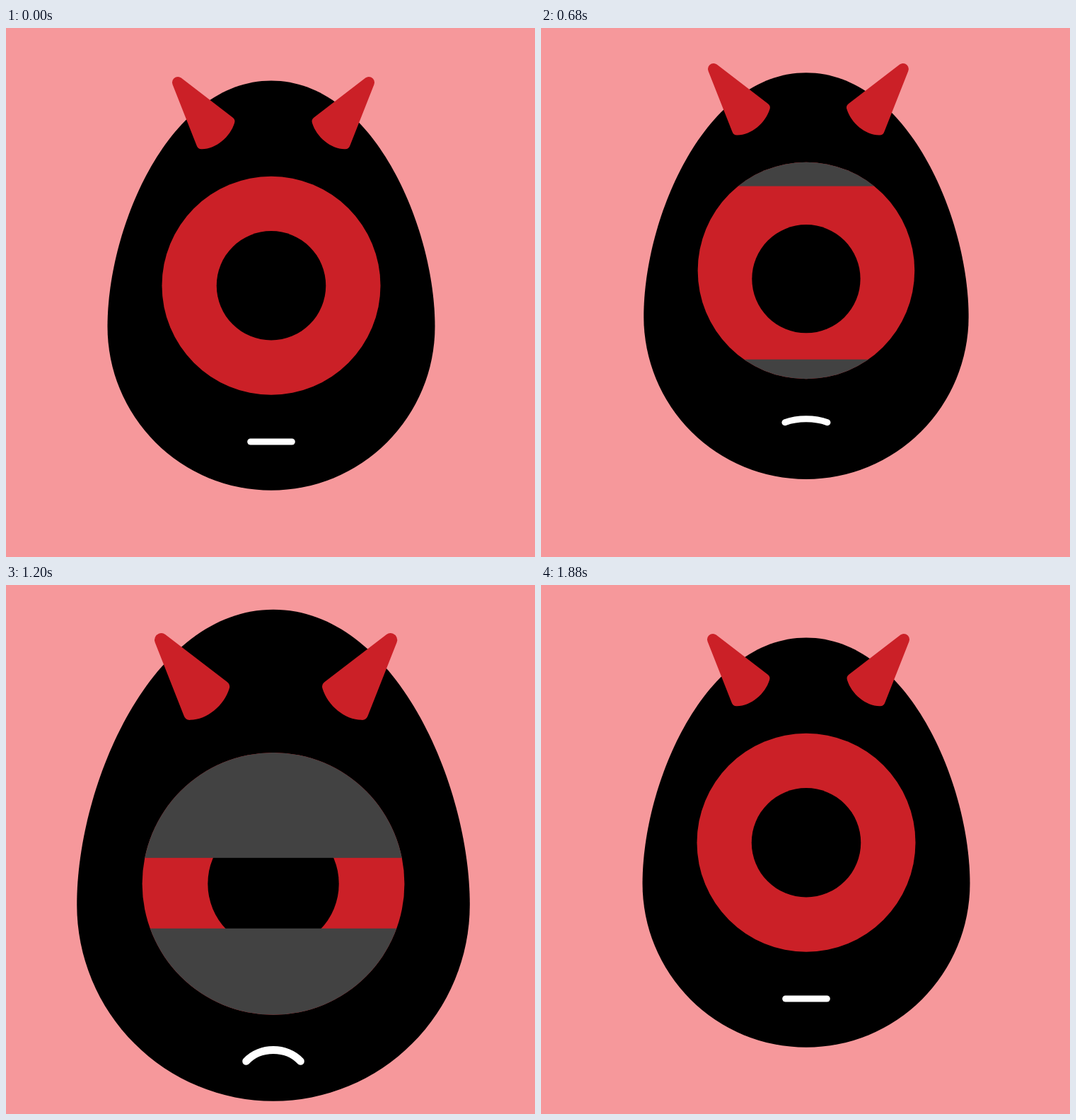
Recreate the animation shown at these times as an HTML page with a canvas. Size 748x748 px, loop 1.92 s.

```html
<!DOCTYPE html>
<html lang="en">
<head>
<meta charset="utf-8">
<title>Grumpy egg</title>
<style>
html, body { margin: 0; width: 100%; height: 100%; overflow: hidden; background: #f6989b; }
canvas { display: block; width: 100vw; height: 100vh; }
</style>
</head>
<body>
<canvas id="stage" width="748" height="748"></canvas>
<script>
const ctx = document.getElementById('stage').getContext('2d');
const LOOP = 1920, STEP = 40, SIZE = 748;
const PINK = '#f6989b', RED = '#cb2027', GREY = '#424242', BLACK = '#000', WHITE = '#fff';
const CX = 375, CY = 364.25, EYE = 154.5;

const clamp = x => Math.min(1, Math.max(0, x));
const mix = (a, b, u) => a + (b - a) * u;

// Eased 0 to 1 between two times; bend below 1 starts faster, above 1 slower.
function ramp(t, from, to, bend = 1) {
  const u = clamp((t - from) / (to - from)) ** bend;
  return u * u * (3 - 2 * u);
}

// Wind up to low, burst to high, then calm down to zero.
const WIND = 600;
const GROW = [WIND, 1000, 0.62], SNAP = [WIND, 870, 0.6], SETTLE = [1380, 1860, 0.8];
const swing = (low, high, bend, burst, calm) => t =>
  low * ramp(t, 0, WIND, bend) + (high - low) * ramp(t, ...burst) - high * ramp(t, ...calm);

const growth = swing(-0.1, 0.2, 1.38, GROW, [1280, 1680]);
const drop = swing(-27.4, 17.8, 1.94, GROW, SETTLE);
const faceShift = swing(-44.8, 33.4, 1.68, SNAP, SETTLE);
const pupilShift = swing(-22.4, 33.4, 1.68, SNAP, SETTLE);

const frown = t => ramp(t, WIND, 840, 0.8) - ramp(t, 1400, 1700);
const tremble = t => ramp(t, 820, 920) * (1 - ramp(t, 1280, 1620));
const wave = (t, speed, phase) => Math.sin((phase + (t - 1200) * speed) * Math.PI / 180);

// Lids snap in, creep on, then open.
function squint(t) {
  const creep = clamp((t - WIND) / 800) ** 0.106;
  return ramp(t, WIND, 800) * creep * (1 - ramp(t, 1400, 1680));
}

function disc(y, r, color) {
  ctx.beginPath();
  ctx.arc(0, y, r, 0, Math.PI * 2);
  ctx.fillStyle = color;
  ctx.fill();
}

function egg() {
  const w = 231.5, top = -289.75, side = 58;
  ctx.beginPath();
  ctx.arc(0, side, w, 0, Math.PI);
  ctx.bezierCurveTo(-w, -84, -143, top, 0, top);
  ctx.bezierCurveTo(143, top, w, -84, w, side);
  ctx.fillStyle = BLACK;
  ctx.fill();
}

function horn(dir) {
  ctx.save();
  ctx.translate(3, -CY);
  ctx.scale(dir, 1);
  ctx.translate(-378, 0);
  ctx.beginPath();
  ctx.arc(243, 77, 8, 2.76, 5.34);
  ctx.lineTo(320.5, 126.5);
  ctx.quadraticCurveTo(324.8, 129.8, 323, 134.5);
  ctx.bezierCurveTo(317, 154, 297, 171, 277, 171.3);
  ctx.quadraticCurveTo(271.3, 171.6, 269.5, 166);
  ctx.closePath();
  ctx.fillStyle = RED;
  ctx.fill();
  ctx.restore();
}

function lids(shut) {
  if (shut <= 0) return;
  const top = mix(-156, -26.6, shut), low = mix(156, 49.5, shut);
  ctx.save();
  ctx.beginPath();
  ctx.arc(0, 0, EYE, 0, Math.PI * 2);
  ctx.clip();
  ctx.fillStyle = GREY;
  ctx.fillRect(-160, -160, 320, top + 160);
  ctx.fillRect(-160, low, 320, 160 - low);
  ctx.restore();
}

function mouth(f) {
  const x = mix(29.3, 32, f), bend = mix(10, 16, f);
  const y = mix(220.75, 209.2, f), peak = mix(220.75, 191.5, f);
  ctx.beginPath();
  ctx.moveTo(-x, y);
  ctx.bezierCurveTo(-bend, peak, bend, peak, x, y);
  ctx.lineWidth = 9;
  ctx.lineCap = 'round';
  ctx.strokeStyle = WHITE;
  ctx.stroke();
}

function draw(t) {
  const grown = growth(t), shake = tremble(t), shift = faceShift(t);
  ctx.fillStyle = PINK;
  ctx.fillRect(0, 0, SIZE, SIZE);
  ctx.save();
  ctx.translate(
    CX + 7.5 * grown + 5.2 * shake * wave(t, 2.335, 163),
    CY + drop(t) + 4 * shake * wave(t, 3, 176)
  );
  ctx.scale(1 + grown, 1 + grown);
  egg();
  ctx.translate(0, shift);
  horn(1);
  horn(-1);
  disc(0, EYE, RED);
  disc(pupilShift(t) - shift, EYE / 2, BLACK);
  lids(squint(t));
  mouth(frown(t));
  ctx.restore();
}

const start = performance.now();
function tick() {
  const t = (performance.now() - start) % LOOP;
  draw(Math.floor(t / STEP) * STEP);
  requestAnimationFrame(tick);
}
tick();
</script>
</body>
</html>
```
